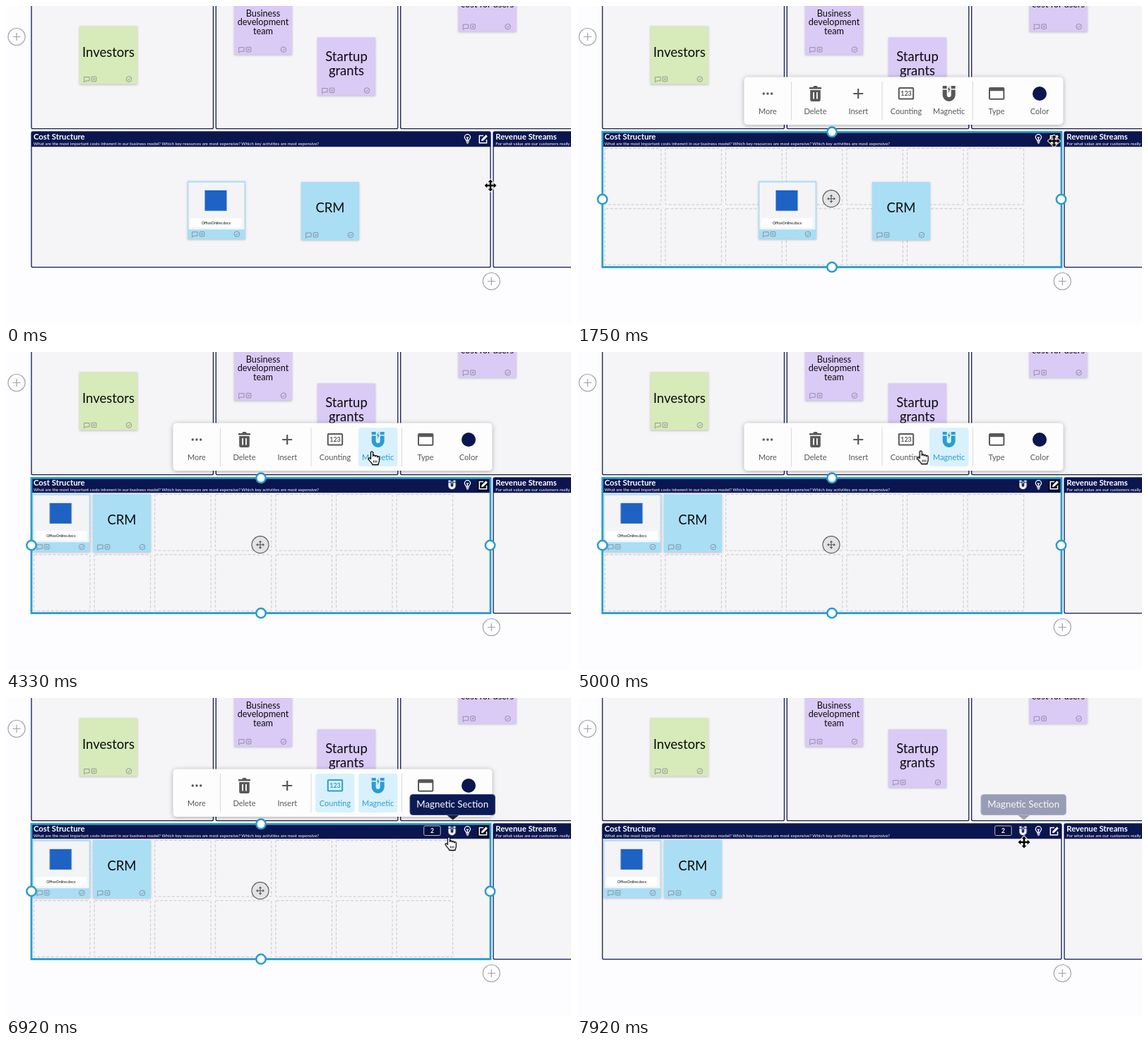
Write an HTML page that moves like this. It is 800 px wide and 450 px high and loops after 8000 ms.

```html
<!DOCTYPE html>
<html lang="en">
<head>
<meta charset="utf-8">
<title>Business model board</title>
<style>
html, body { margin: 0; width: 100%; height: 100%; overflow: hidden; background: #fdfcfe; }
svg { display: block; width: 800px; height: 450px; font-family: Lato, "Open Sans", sans-serif; }
text { fill: #0c0c0e; }
.mid text, text.mid { text-anchor: middle; }
.big { font-size: 18.5px; }
.small { font-size: 12.7px; }
.panel { fill: #f5f4f6; stroke: #101a55; stroke-width: 1.3; }
.bar { fill: #0b1650; }
.title { font-size: 11.3px; font-weight: 700; fill: #fff; }
.sub { font-size: 6.14px; fill: #fff; }
.note { filter: drop-shadow(0 1px 1.5px rgba(40, 40, 70, .28)); }
.line { fill: none; stroke: currentColor; }
.solid { fill: currentColor; }
.green { fill: #d7eaba; }
.purple { fill: #d9caf6; }
.blue { fill: #a9def5; }
.cell { fill: none; stroke: #c8c8ca; stroke-dasharray: 4 2.5; }
.frame { fill: none; stroke: #2a9dcd; stroke-width: 2.8; }
.knob circle { fill: #fff; stroke: #2a9dcd; stroke-width: 2.5; }
.tools { color: #58585a; font-size: 11px; }
.tools text { fill: currentColor; }
.box { filter: drop-shadow(0 1px 3px rgba(0, 0, 0, .3)); }

.anim, .tab rect, .tab { animation: 8s linear infinite; }
.hard { animation-timing-function: step-end; }
.select { animation-name: select; }
.tools { animation-name: tools; }
.doc { animation-name: doc; }
.crm { animation-name: crm; }
.magnet-on { animation-name: magnetOn; }
.count-on { animation-name: countOn; }
.tab { animation-timing-function: step-end; }
.tab rect.bg { fill: #d9f1fd; animation-timing-function: step-end; }
.magnetic { animation-name: magTint; }
.magnetic .bg { animation-name: magBg; }
.counting { animation-name: cntTint; }
.counting .bg { animation-name: cntBg; }
.tip { animation-name: tip; }
.cursor { animation-name: path; animation-timing-function: ease-in-out; }
.hand { animation-name: hand; }
.arrows { animation-name: arrows; }

@keyframes select { 0%, 100% { opacity: 0 } 12.5% { opacity: 1 } 93.7% { opacity: 0 } }
@keyframes tools { 0%, 12.5% { opacity: 0 } 14.5%, 93.7% { opacity: 1 } 94.7%, 100% { opacity: 0 } }
@keyframes doc {
  0%, 50% { transform: translate(257px, 247.8px); animation-timing-function: ease-out }
  53.5%, 100% { transform: translate(37.3px, 200.8px) }
}
@keyframes crm {
  0%, 50% { transform: translate(418px, 249px); animation-timing-function: ease-out }
  53.5%, 100% { transform: translate(123px, 201px) }
}
@keyframes magnetOn { 0%, 100% { opacity: 0 } 50% { opacity: 1 } }
@keyframes countOn { 0%, 100% { opacity: 0 } 71.8% { opacity: 1 } }
@keyframes magTint { 0%, 100% { color: #58585a } 43.7% { color: #2a9dd0 } }
@keyframes magBg { 0%, 100% { opacity: 0 } 43.7% { opacity: 1 } }
@keyframes cntTint { 0%, 100% { color: #58585a } 70.8% { color: #2a9dd0 } }
@keyframes cntBg { 0%, 100% { opacity: 0 } 70.8% { opacity: 1 } }
@keyframes tip { 0%, 84.4% { opacity: 0 } 86%, 97.5% { opacity: 1 } 99% { opacity: .4 } 100% { opacity: .1 } }
@keyframes hand { 0%, 100% { opacity: 0 } 35% { opacity: 1 } 97.8% { opacity: 0 } }
@keyframes arrows { 0%, 100% { opacity: 1 } 35% { opacity: 0 } 97.8% { opacity: 1 } }
@keyframes path {
  0%, 1% { transform: translate(686px, 254px) }
  9.4%, 24.5% { transform: translate(675.5px, 191px) }
  30.2%, 33.3% { transform: translate(640px, 173px) }
  42.7%, 59.3% { transform: translate(521px, 150px); animation-timing-function: ease-in }
  62.5% { transform: translate(489.8px, 149px); animation-timing-function: ease-out }
  66%, 80% { transform: translate(470.5px, 145px) }
  85.4%, 96% { transform: translate(629.8px, 206px) }
  98.5%, 100% { transform: translate(633px, 204px) }
}
</style>
</head>
<body>
<svg viewBox="0 0 800 450">
  <defs>
    <g id="foot" color="#6c6c78" stroke-width=".8" opacity=".8">
      <path class="line" d="M6.7 72h7.4v5.4H9l-2.3 2z"/>
      <rect class="line" x="17.2" y="71.6" width="6.6" height="6.6" rx=".8"/>
      <path class="line" d="M19 73.5l3 3m0-3l-3 3"/>
      <circle class="line" cx="70" cy="75" r="3.8"/>
      <path class="line" d="M68.1 75l1.4 1.4 2.6-2.9"/>
    </g>
    <path id="sheet" d="M0 0h82v82H0z"/>
    <g id="magnet" class="solid">
      <path d="M-9-11h6v4h-6zM3-11h6v4H3zM-9-5.5h6V2a3 3 0 0 0 6 0V-5.5h6V2A9 9 0 0 1-9 2z"/>
      <path d="M1-11.5l-3 6h1.8l-1 5.500 3.300-7H.3z"/>
    </g>
    <g id="add" class="line" color="#a2a2a6">
      <circle r="12" stroke-width="1.2"/>
      <path d="M-5.500 0h11M0-5.500v11" stroke-width="1.2"/>
    </g>
  </defs>

  <rect width="800" height="450" fill="#fdfcfe"/>
  <g class="panel">
    <rect x="36" y="-20" width="257.500" height="193.700" rx="2"/>
    <rect x="297.300" y="-20" width="257.500" height="193.700" rx="2"/>
    <rect x="558.700" y="-20" width="260" height="193.700" rx="2"/>
    <rect x="36" y="178" width="650" height="191.700" rx="2"/>
    <rect x="690" y="178" width="130" height="191.700" rx="2"/>
  </g>
  <path class="bar" d="M36 199.300V180q0-2 2-2h646q2 0 2 2v19.300zM690 199.300V180q0-2 2-2h108v21.300z"/>
  <use href="#add" x="15" y="43.500"/>
  <use href="#add" x="687.300" y="389.500"/>

  <text class="title" x="39" y="189">Cost Structure</text>
  <text class="sub" x="39" y="197">What are the most important costs inherent in our business model? Which key resources are most expensive? Which key activities are most expensive?</text>
  <text class="title" x="693.300" y="189">Revenue Streams</text>
  <text class="sub" x="693.300" y="197">For what value are our customers really willing to pay?</text>

  <g class="mid">
    <g class="note" transform="translate(104 28.500)">
      <use href="#sheet" class="green"/><use href="#foot"/>
      <text class="big" x="41" y="43">Investors</text>
    </g>
    <g class="note" transform="translate(323 -13.300)">
      <use href="#sheet" class="purple"/><use href="#foot"/>
      <text class="small" x="41" y="28">Business</text>
      <text class="small" x="41" y="40.800">development</text>
      <text class="small" x="41" y="53.300">team</text>
    </g>
    <g class="note" transform="translate(441 44.500)">
      <use href="#sheet" class="purple"/><use href="#foot"/>
      <text class="big" x="41" y="33.700">Startup</text>
      <text class="big" x="41" y="53">grants</text>
    </g>
    <g class="note" transform="translate(640.500 -45.800)">
      <use href="#sheet" class="purple"/><use href="#foot"/>
      <text class="small" x="41" y="48">cost for users</text>
    </g>
  </g>

  <g class="anim hard select">
    <rect x="667" y="180" width="16.500" height="17" fill="#060a1e"/>
    <g id="grid"></g>
  </g>

  <g class="anim hard magnet-on" color="#fff">
    <use href="#magnet" transform="translate(631.500 188) scale(.57)"/>
  </g>
  <g class="anim hard count-on">
    <rect x="591.700" y="181" width="23.500" height="13.500" rx="2" fill="#070f3a" stroke="#c9cde0" stroke-width=".9"/>
    <text class="mid" x="603.500" y="190.700" font-size="8.500" font-weight="700" style="fill:#fff">2</text>
  </g>
  <g color="#fff">
    <path class="line" stroke-width="1.300" d="M651.700 190.500c0-1.600-2.400-2.300-2.400-4.700a4.100 4.100 0 0 1 8.200 0c0 2.400-2.400 3.100-2.400 4.700zM651.500 192.300h4M652.200 194.200h2.600M653.400 190v-3.200m-1.500-1.300l1.500 1.300 1.500-1.300"/>
    <path class="line" stroke-width="1.500" d="M676 183.500h-5.700v10.300h10.200V189"/>
    <path class="solid" d="M673 191.200l.6-3 6-6 2.300 2.300-6 6z"/>
  </g>

  <g class="mid">
    <g class="anim doc"><g class="note">
      <use href="#sheet" class="blue"/>
      <path d="M1.500 2h79v66.500h-79z" fill="#f4f4f7"/>
      <rect x="24.500" y="13" width="31" height="29" fill="#1e62c4"/>
      <path d="M4 52.500h72.500v13H4z" fill="#fff"/>
      <text x="40.500" y="60.800" font-size="5.200">OfficeOnline.docx</text>
      <use href="#foot"/>
    </g></g>
    <g class="anim crm"><g class="note">
      <use href="#sheet" class="blue"/><use href="#foot"/>
      <text class="big" x="41" y="43">CRM</text>
    </g></g>
  </g>

  <g class="anim hard select">
    <rect class="frame" x="36" y="178.300" width="650" height="191.200"/>
    <g class="knob">
      <circle cx="361" cy="178.300" r="6.700"/><circle cx="361" cy="369.500" r="6.700"/>
      <circle cx="36" cy="273.500" r="6.700"/><circle cx="685.500" cy="273.500" r="6.700"/>
    </g>
    <g transform="translate(360 272.700)">
      <circle r="12" fill="#e3e3e5" stroke="#5c5c60" stroke-width="1.200"/>
      <path d="M-4 0h8M0-4v8" stroke="#58585a" stroke-width="1.100"/>
      <path d="M0-6l2.200 2.600h-4.400zM0 6l2.200-2.600h-4.400zM-6 0l2.600-2.200v4.400zM6 0L3.400-2.200v4.400z" fill="#58585a"/>
    </g>
  </g>

  <g class="anim tools mid">
    <rect class="box" x="236.500" y="100.500" width="452" height="67.500" rx="5" fill="#fdfdfe"/>
    <path d="M303.500 107v55M432 107v55M560.500 107v55" stroke="#d9d9dc"/>
    <g class="solid"><circle cx="264.300" cy="124" r="1.700"/><circle cx="270" cy="124" r="1.700"/><circle cx="275.700" cy="124" r="1.700"/></g>
    <text x="270" y="153">More</text>
    <path class="solid" fill-rule="evenodd" d="M329 115h5l1.500-2h4l1.500 2h5v2.500h-17zM330.200 119h14.600v13.500q0 2.500-2.500 2.500h-9.600q-2.500 0-2.500-2.500zm4 3v9.500h1.800V122zm4.800 0v9.500h1.800V122z"/>
    <text x="337.500" y="153">Delete</text>
    <path class="line" stroke-width="2.200" d="M391.200 124h14M398.200 117v14"/>
    <text x="398.300" y="153">Insert</text>
    <g class="tab counting">
      <rect class="bg" x="438" y="107" width="55.500" height="55" rx="4"/>
      <rect class="line" x="455.800" y="116" width="20.400" height="15.600" rx="1" stroke-width="2"/>
      <text x="466" y="127.200" font-size="9" font-weight="700">123</text>
      <text x="466" y="153">Counting</text>
    </g>
    <g class="tab magnetic">
      <rect class="bg" x="499" y="107" width="55.500" height="55" rx="4"/>
      <use href="#magnet" x="526.700" y="124"/>
      <text x="526.700" y="153">Magnetic</text>
    </g>
    <rect class="line" x="584" y="116" width="20.400" height="15.800" rx="1.500" stroke-width="2"/>
    <path class="solid" d="M584 115.500h20.400v4.700H584z"/>
    <text x="594" y="153">Type</text>
    <circle cx="655" cy="124" r="10" fill="#0b1650"/>
    <text x="655" y="153">Color</text>
  </g>

  <g class="anim tip">
    <path d="M624.500 166h16.500l-8.200 6.500z" fill="#1b1e2e"/>
    <rect x="572" y="136.500" width="120.500" height="29" rx="4" fill="#0c1a54" stroke="#44538a"/>
    <text class="mid" x="632.200" y="155.300" font-size="13.300" style="fill:#fff">Magnetic Section</text>
  </g>

  <g class="anim cursor">
    <path class="anim hard arrows" d="M0-8.500L3.500-4.700H1.300v3.400h3.400V-3.500L8.500 0 4.700 3.500V1.300H1.300v3.400h2.200L0 8.500-3.500 4.700h2.200V1.300h-3.400v2.200L-8.500 0l3.800-3.500v2.200h3.400v-3.400h-2.200z" fill="#000" stroke="#fff" stroke-width="2" paint-order="stroke" stroke-linejoin="round"/>
    <g class="anim hard hand" stroke="#000" stroke-width="1.300" stroke-linejoin="round">
      <path fill="#fff" d="M-4.500 1.500V-7.500a1.600 1.600 0 0 1 3.200 0V-2.500a1.500 1.500 0 0 1 3 0v.500a1.500 1.500 0 0 1 3 .300v.600a1.400 1.400 0 0 1 2.800.200V4c0 2-1.400 3-1.400 5.500h-8C-2.500 7-6.500 4.500-7.700 1.500c-.5-1.800 1.700-2.300 3.200 0z"/>
      <path d="M-.5 3.500v3M1.700 3.500v3M3.900 3.500v3" stroke-width=".9"/>
    </g>
  </g>
</svg>
<script>
const grid = document.getElementById('grid');
for (let i = 0; i < 14; i++) {
  const cell = document.createElementNS('http://www.w3.org/2000/svg', 'rect');
  const attrs = { class: 'cell', x: 39.5 + (i % 7) * 85.6, y: i < 7 ? 201.5 : 286.8, width: 79.5, height: 79.5, rx: 1 };
  for (const key in attrs) cell.setAttribute(key, attrs[key]);
  grid.append(cell);
}
</script>
</body>
</html>
```
